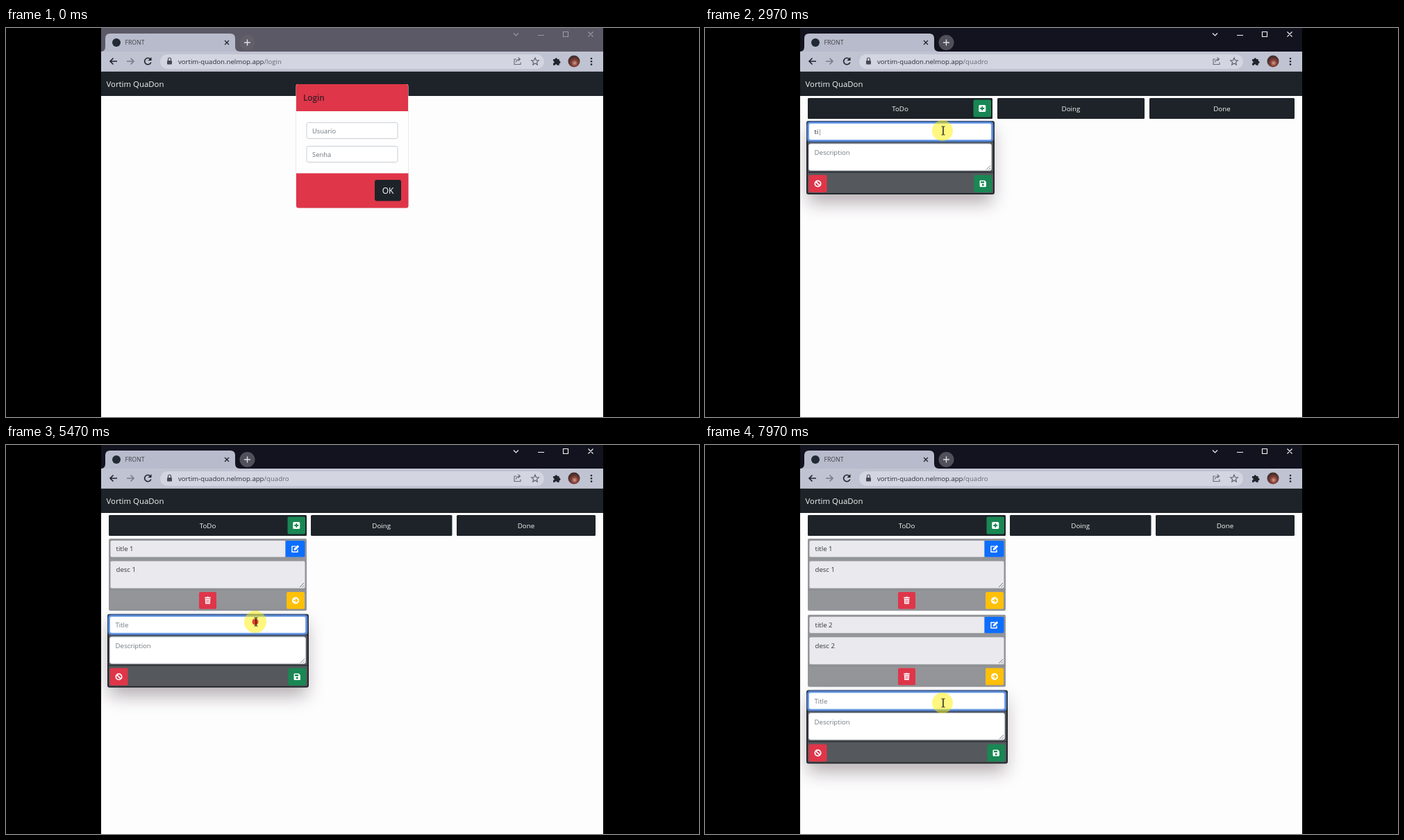
An HTML page that plays this animation: 998x561 px, repeating every 8 s.

```html
<!DOCTYPE html>
<html lang="pt">
<head>
<meta charset="utf-8">
<title>Quadro</title>
<style>
html, body { margin: 0; width: 100%; height: 100%; overflow: hidden; background: #000; }
svg { display: block; width: 100%; height: 100%; font-family: "Open Sans", "Noto Sans", sans-serif; }
</style>
</head>
<body>
<svg id="stage" viewBox="0 0 998 561">
  <defs>
    <radialGradient id="photo" cx=".55" cy=".65">
      <stop offset="0" stop-color="#c9a59a"/><stop offset=".5" stop-color="#8d4036"/><stop offset="1" stop-color="#48302e"/>
    </radialGradient>
    <filter id="soft" x="-30%" y="-60%" width="160%" height="220%"><feGaussianBlur stdDeviation="13"/></filter>
    <filter id="glow" x="-20%" y="-60%" width="140%" height="220%"><feGaussianBlur stdDeviation="1"/></filter>
    <clipPath id="page"><rect x="137" y="98" width="723" height="463"/></clipPath>
  </defs>
  <g id="chrome"></g><g id="view"></g><g id="pointer"></g>
</svg>
<script>
const LOOP = 8000;
const DARK = '#1d2328', RED = '#df3649', GREEN = '#198754', BLUE = '#0d6efd', AMBER = '#ffc008';
const APP = 'Vortim QuaDon', HOST = 'vortim-quadon.nelmop.app', USER = 'mirtapol';

const rect = (x, y, w, h, fill, r = 0, more = '') =>
  `<rect x="${x}" y="${y}" width="${w}" height="${h}" rx="${r}" fill="${fill}" ${more}/>`;
const text = (x, y, s, size, fill, more = '') =>
  `<text x="${x}" y="${y}" font-size="${size}" fill="${fill}" xml:space="preserve" ${more}>${s}</text>`;
const line = (d, stroke, w = 1, more = '') =>
  `<path d="${d}" fill="none" stroke="${stroke}" stroke-width="${w}" ${more}/>`;
const shape = (d, fill, more = '') => `<path d="${d}" fill="${fill}" ${more}/>`;
const circle = (x, y, r, fill, more = '') => `<circle cx="${x}" cy="${y}" r="${r}" fill="${fill}" ${more}/>`;
const at = (x, y, s) => `<g transform="translate(${x} ${y})">${s}</g>`;

// Icons are centred on 0,0
const icons = {
  plus: rect(-5, -5, 10, 10, '#fff', 1.5) + line('M-3 0H3M0-3V3', GREEN, 1.8),
  ban: line('M-3-3L3 3', '#fff', 1.8) + circle(0, 0, 4.2, 'none', 'stroke="#fff" stroke-width="1.7"'),
  save: shape('M-4.7-3.6Q-4.7-4.7-3.6-4.7H2.4L4.7-2.4V3.6Q4.7 4.7 3.6 4.7H-3.6Q-4.7 4.7-4.7 3.6Z', '#fff') +
    rect(-3.2, -3.3, 5, 2.4, GREEN) + circle(0, 1.8, 1.5, GREEN),
  trash: shape('M-4.3-4.7H-1.6L-1-5.4H1L1.6-4.7H4.3V-3.3H-4.3ZM-3.8-2.6H3.8L3.3 5H-3.3Z', '#fff') +
    line('M-1.8-1.3V3.8M0-1.3V3.8M1.8-1.3V3.8', RED, .7),
  next: circle(0, 0, 5, '#fff') + line('M-3 0H2.5M0-2.7L2.7 0L0 2.7', AMBER, 1.5),
  edit: line('M1-3.6H-4.6V4.5H3.5V1', '#fff', 1.4, 'stroke-linejoin="round"') +
    shape('M-1.9 2.2L-1.5-.4L3.5-5.4L5.7-3.2L.7 1.8Z', '#fff')
};
const button = (x, y, w, h, fill, icon) =>
  rect(x, y, w, h, fill, 2) + at(x + w / 2, y + h / 2, icons[icon]);

function chrome(active) {
  const control = active ? '#f4f4f6' : '#9b99a4', ink = '#20242c';
  return rect(137, 0, 723, 561, '#fdfdfd') +
    rect(137, 0, 723, 35, active ? '#13131f' : '#5c5966') +
    shape('M137 34Q143 34 143 27V15Q143 8 150 8H323Q330 8 330 15V27Q330 34 337 34Z', '#b8bbcb') +
    rect(137, 34, 723, 29, '#c0c3d2') + rect(137, 62, 723, 1, '#a9acb7') +
    circle(159, 21, 6, '#222b33') + text(171.5, 24.3, 'FRONT', 8.7, '#3c4049') +
    line('M315 18l6 6m0-6l-6 6', ink, 1.3) +
    circle(347.5, 21, 11, active ? '#50505b' : '#625f6b') +
    line('M343 21h9M347.500 16.500v9', '#dedee4', 1.4) +
    line('M731 7.500l3.500 3.500l3.500-3.500M766 10.500h9M802.500 5.500h7v7h-7zM838.500 5.500l7 7m0-7l-7 7', control, 1.1) +
    line('M160 48h-10m4.500-4.500l-4.500 4.500l4.500 4.500', ink, 1.6) +
    line('M174 48h10m-4.500-4.500l4.500 4.500l-4.500 4.500', '#777b87', 1.5) +
    line('M208 45A4.700 4.700 0 1 0 208.800 49.500', ink, 1.6) + shape('M209.500 42v5h-5z', ink) +
    rect(222, 38, 553, 21, '#d3d5e0', 10.5) +
    rect(232, 47, 7, 5.500, '#454a54', 1) + line('M233.500 47v-2a2 2 0 0 1 4 0v2', '#454a54', 1.2) +
    line('M735 45h-3v7.500h9v-3M734.500 49.500q.5-4 5-4.500m-2-2.500l3 2.500l-3 2.500', '#666a76', 1.1) +
    line('M762 43l1.500 3.500l3.800.3l-2.900 2.500l.9 3.700l-3.300-2l-3.300 2l.9-3.700l-2.900-2.500l3.800-.3z', '#5b606c', 1.1) +
    shape('M788 45h2.500a1.800 1.800 0 0 1 3.600 0h2.600v2.600a1.800 1.800 0 0 1 0 3.600v2.600h-3a1.600 1.600 0 0 0-3.200 0h-2.500v-3a1.600 1.600 0 0 0 0-3.200z', ink) +
    circle(818, 48, 8.500, 'url(#photo)') +
    [44, 48.3, 52.6].map(y => circle(843, y, 1.3, ink)).join('') +
    rect(137, 63, 723, 35, DARK) + text(144.5, 85, APP, 11.4, '#f4f5f6');
}

const address = path =>
  text(248, 52, `${HOST}<tspan fill="#656a76">/${path}</tspan>`, 9.6, '#292d36');

// White field with an optional blue focus ring
const field = (x, y, w, h, focus, fill = '#fff') =>
  (focus ? rect(x - .5, y - .5, w + 1, h + 1, 'none', 3, 'stroke="#5f9bff" stroke-width="3" filter="url(#glow)"') : '') +
  rect(x + .5, y + .5, w - 1, h - 1, fill, 2.5, `stroke="${focus ? '#7eaaf0' : '#c9ced4'}"`);

function login(t) {
  const filled = t >= 1050, onPass = t >= 1150;
  const dots = Math.max(0, Math.min(8, Math.floor((t - 1250) / 60) + 1));
  const placeholder = '#6d747c';
  let s = address('login') +
    rect(417.5, 81, 162, 179, '#d6d7d9', 3) + rect(418, 81, 161, 178.500, '#fefefe', 3) +
    shape('M418 120V84q0-3 3-3h155q3 0 3 3v36z', RED) +
    shape('M418 209.500h161.500V256q0 3.500-3 3.500h-155q-3.500 0-3.500-3.500z', RED) +
    text(428, 105, 'Login', 11.7, '#3d1d28', 'font-weight="600"') +
    field(432.5, 136, 132, 24, t >= 640 && !onPass, filled ? '#e9effd' : '#fff') +
    text(441, 151.500, filled ? USER : 'Usuario', 9.4, filled ? '#25292e' : placeholder) +
    field(432.5, 170, 132, 24, onPass);
  s += dots ? '' : text(441, 185.700, 'Senha', 9.4, placeholder);
  for (let i = 0; i < dots; i++) s += circle(443.2 + i * 4.2, 182.600, 1.35, '#24282d');
  return s + rect(531, 219, 38, 30.500, DARK, 3) + text(550, 239.200, 'OK', 12, '#fff', 'text-anchor="middle"');
}

const grip = (x, y) => line(`M${x - 7} ${y}l6-6M${x - 3.5} ${y}l2.500-2.500`, '#6b6e72', .9);

function columns(wide) {
  const spans = wide ? [[148, 433], [439, 642.5], [649, 849]] : [[148, 414], [421, 633], [640, 849]];
  return spans.map(([a, b], i) => rect(a, 101, b - a, 30, DARK, 1.5) +
    text((a + b) / 2, 120, ['ToDo', 'Doing', 'Done'][i], 9.8, '#f6f7f7', 'text-anchor="middle"')).join('') +
    button(spans[0][1] - 27.5, 103.5, 25.5, 25, GREEN, 'plus');
}

const card = (row, n) => at(0, row * 109.8,
  rect(148, 135, 285, 104, '#939599', 2) +
  rect(150.5, 138, 252, 23.5, '#e9e9ee', 2) + text(158.5, 153.400, `title ${n}`, 9.6, '#33373c') +
  button(402.5, 138, 28, 23.5, BLUE, 'edit') +
  rect(150.5, 167.5, 280, 39, '#e9e9ee', 2) + text(158.5, 183.400, `desc ${n}`, 9.6, '#33373c') +
  grip(430, 205) + rect(148, 208.5, 285, 1, '#85888d') +
  button(278, 212, 25, 24.5, RED, 'trash') + button(404, 212, 26, 24.5, AMBER, 'next'));

function typed(word, start, step, t) {
  const n = Math.floor((t - start) / step) + 1;
  const end = start + (word.length - 1) * step;
  return { s: n > 0 ? word.slice(0, n) : '', caret: n > 0 && t < end + 100, done: t >= end + 100 };
}

const entry = (y, value, hint) => value.s
  ? `<text x="157.5" y="${y}" font-size="9.6" fill="#25292e" xml:space="preserve">${value.s}${
    value.caret ? '<tspan dx="-.5" font-weight="300">|</tspan>' : ''}</text>`
  : text(157.5, y, hint, 9.6, '#72787f');

function form(row, right, job, t) {
  const w = right - 149.5 + .5;
  const title = typed(`title ${row + 1}`, job.title, job.pace[0], t);
  const desc = typed(`desc ${row + 1}`, job.desc, job.pace[1], t);
  const onDesc = t >= job.tab, onTitle = t >= job.focus && !onDesc;
  let squiggle = 'M158 184.800';
  for (let i = 0; i < 10; i++) squiggle += `l1 ${i % 2 ? -1.2 : 1.2}l1 ${i % 2 ? 1.2 : -1.2}`;
  return at(0, row * 109.8,
    rect(148, 147, w + 2, 105, '#2a1420', 3, 'opacity=".34" filter="url(#soft)"') +
    rect(147, 135, w + 5, 104, '#55595d', 2, 'stroke="#25292e" stroke-width="2"') +
    rect(148, 163, w + 3, 2, '#34393e') + rect(148, 207, w + 3, 2, '#34393e') +
    field(149, 137, w, 25, onTitle) + entry(153.400, title, 'Title') +
    field(149, 166.500, w, 39.5, onDesc) + entry(183.400, desc, 'Description') +
    (desc.done ? line(squiggle, '#e0505e', .8) : '') + grip(right - 1, 204.500) +
    button(149.5, 212, 26, 25, RED, 'ban') + button(right - 25.5, 212, 25.5, 25, GREEN, 'save'));
}

const jobs = [
  { open: 2600, save: 4440, focus: 2840, title: 2890, tab: 3450, desc: 3550, pace: [75, 80] },
  { open: 5000, save: 6680, focus: 5430, title: 5650, tab: 6080, desc: 6120, pace: [60, 55] },
  { open: 7460, save: 9e9, focus: 7860, title: 9e9, tab: 9e9, desc: 9e9, pace: [60, 60] }
];

function board(t) {
  const wide = t >= jobs[0].save;
  let s = address('quadro') + columns(wide);
  jobs.forEach((job, i) => {
    if (t >= job.save) s += card(i, i + 1);
    else if (t >= job.open) s += form(i, wide ? 432 : 413, job, t);
  });
  return `${s.slice(0, 0)}${address('quadro')}<g clip-path="url(#page)">${s.slice(address('quadro').length)}</g>`;
}

// time, x, y, pointer kind from that time
const path = [
  [150, 640, 400, 'arrow'], [520, 500, 148, 'beam'], [1580, 500, 148, 'beam'], [1860, 551, 231, 'hand'],
  [2300, 551, 231, 'arrow'], [2520, 399, 117, 'hand'], [2640, 399, 117, 'arrow'], [2800, 342, 148, 'beam'],
  [4120, 342, 148, 'arrow'], [4360, 400, 226, 'hand'], [4560, 400, 226, 'arrow'], [4860, 418, 117, 'hand'],
  [5080, 418, 117, 'arrow'], [5380, 359, 255, 'beam'], [6380, 359, 255, 'arrow'], [6600, 420, 332, 'hand'],
  [6950, 420, 332, 'arrow'], [7320, 418, 117, 'hand'], [7520, 418, 117, 'arrow'], [7820, 342, 372, 'beam']
];
const clicks = [640, 1920, 2560, 2840, 4400, 4940, 5430, 6640, 7400, 7860];
const pointers = {
  arrow: shape('M0 0V12.500L3 9.800L5 14.300L7 13.400L5 9H9Z', '#fff', 'stroke="#111" stroke-width=".8"'),
  beam: line('M-1.500-6h2q.5 0 .5 1v10q0 1-.5 1h-2M3.500-6h-2q-.5 0-.5 1v10q0 1 .5 1h2', '#222', 1),
  hand: shape('M-1-.5q1.500-1.500 2.500 0V5l5 1q2 .5 1.800 2.500L7.500 14H1.500L-2.500 8.500q-.5-1.700 1.500-1.200z', '#fff', 'stroke="#111" stroke-width=".9"')
};

function pointer(t) {
  const i = path.findLastIndex(p => t >= p[0]);
  if (i < 0) return '';
  const [t0, x0, y0, kind] = path[i], [t1, x1, y1] = path[i + 1] || [LOOP, x0, y0];
  const u = (t - t0) / (t1 - t0), e = u * u * (3 - 2 * u);
  const down = clicks.some(c => t >= c && t < c + 110);
  return at((x0 + (x1 - x0) * e).toFixed(1), (y0 + (y1 - y0) * e).toFixed(1),
    circle(0, 0, down ? 16 : 15, '#fff000', 'opacity=".5"') +
    (down ? circle(0, 0, 4.5, '#e02018', 'opacity=".85"') : '') + pointers[kind]);
}

const drawn = {};
function put(id, markup) {
  if (drawn[id] === markup) return;
  document.getElementById(id).innerHTML = drawn[id] = markup;
}

const start = performance.now();
function draw(now) {
  const t = Math.max(0, now - start) % LOOP;
  put('chrome', chrome(t >= 640));
  put('view', t < 2250 ? login(t) : board(t));
  put('pointer', pointer(t));
  requestAnimationFrame(draw);
}
draw(start);
</script>
</body>
</html>
```
